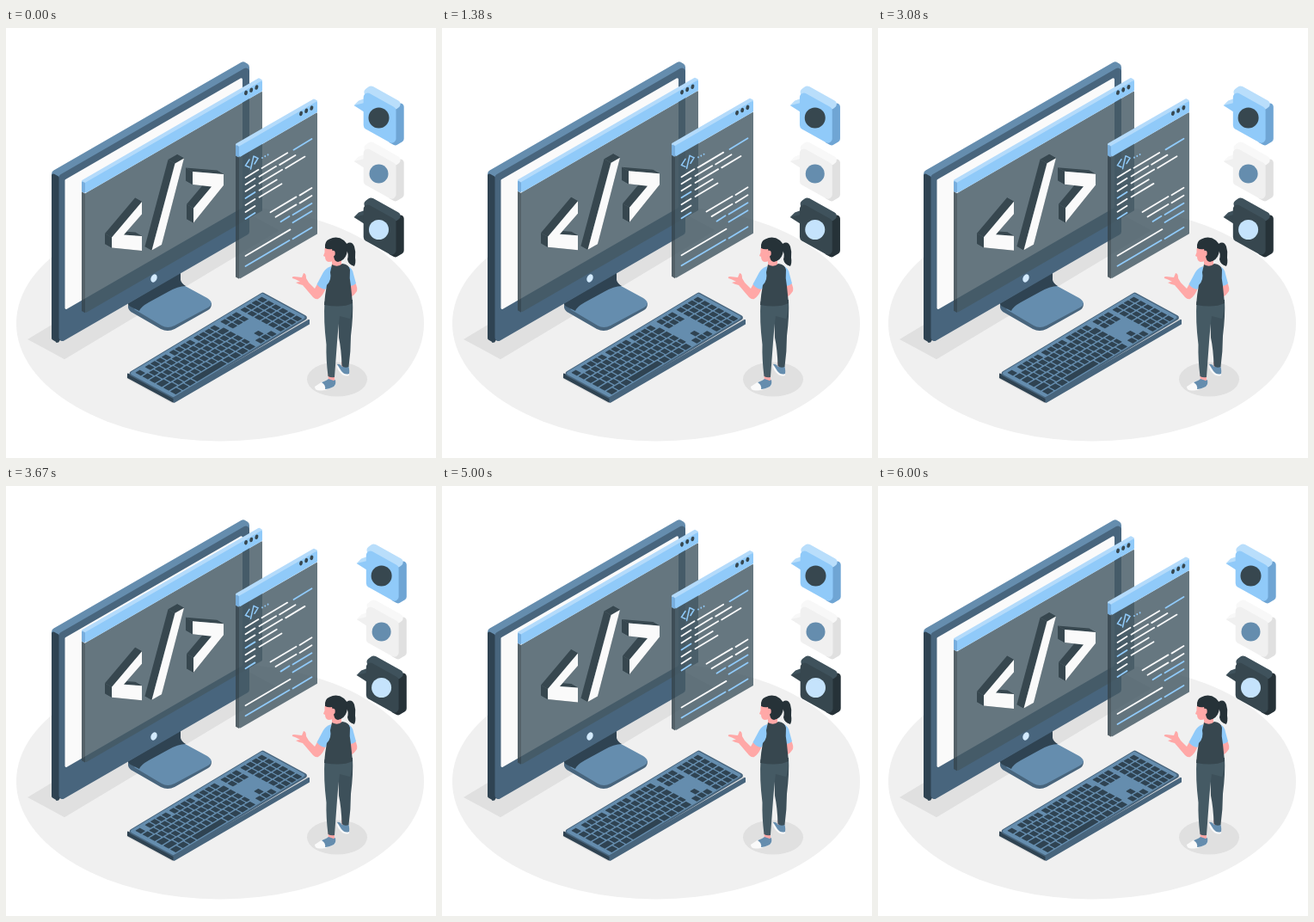
An HTML page with a canvas that plays this animation: 500 px wide and 500 px high, repeating every 6.04 s.

```html
<!DOCTYPE html>
<html lang="en">
<head>
<meta charset="utf-8">
<title>Isometric coding scene</title>
<style>
  html, body { margin: 0; width: 100%; height: 100%; overflow: hidden; background: #fff; }
  canvas { display: block; width: 500px; height: 500px; }
</style>
</head>
<body>
<canvas id="stage"></canvas>
<script>
const canvas = document.getElementById('stage');
const ctx = canvas.getContext('2d');
const ratio = window.devicePixelRatio || 1;
canvas.width = canvas.height = 500 * ratio;

const LOOP = 6040;
const FRAME = 1000 / 24;
const ISO = Math.tan(Math.PI / 6);
const SKY = '#90caf9', STEEL = '#658dae', SLATE = '#48657d', NAVY = '#2f4352';
const INK = '#263238', COAL = '#37474f', GREY = '#455a64', SKIN = '#ffa8a7';
const PAPER = '#fafafa', SHADE = '#e0e0e0';
const GLASS = 'rgba(69,90,100,.82)', GLASS_EDGE = 'rgba(55,71,79,.85)';

function shape(color, d) {
  ctx.fillStyle = color;
  ctx.fill(new Path2D(d));
}

function line(color, width, d) {
  ctx.strokeStyle = color;
  ctx.lineWidth = width;
  ctx.stroke(new Path2D(d));
}

// Polygon from a flat list of coordinates, with optional corner rounding.
function poly(color, c, r = 0) {
  const n = c.length;
  ctx.beginPath();
  ctx.moveTo((c[n - 2] + c[0]) / 2, (c[n - 1] + c[1]) / 2);
  for (let i = 0; i < n; i += 2) {
    ctx.arcTo(c[i], c[i + 1], c[(i + 2) % n], c[(i + 3) % n], r);
  }
  ctx.closePath();
  ctx.fillStyle = color;
  ctx.fill();
}

// Upright isometric face; a negative slope rises to the right.
function wall(color, x, y, w, h, r = 0, slope = -ISO) {
  const d = w * slope;
  poly(color, [x, y, x + w, y + d, x + w, y + d + h, x, y + h], r);
}

// Plate lying on the floor: corner (x, y), long side going up right, short side down right.
function plate(color, x, y, long, short, r = 0) {
  poly(color, [x, y, x + long, y - long * 0.6, x + long + short, y + short * 0.54 - long * 0.6, x + short, y + short * 0.54], r);
}

// Flat face with its sides swept back along (dx, dy).
function extrude(face, side, c, dx, dy) {
  const n = c.length;
  for (let i = 0; i < n; i += 2) {
    const x = c[(i + 2) % n], y = c[(i + 3) % n];
    poly(side, [c[i], c[i + 1], x, y, x + dx, y + dy, c[i] + dx, c[i + 1] + dy]);
  }
  poly(face, c);
}

function oval(color, x, y, rx, ry = rx, turn = 0) {
  ctx.beginPath();
  ctx.ellipse(x, y, rx, ry, turn, 0, Math.PI * 2);
  ctx.fillStyle = color;
  ctx.fill();
}

function at(x, y, draw) {
  ctx.save();
  ctx.translate(x, y);
  draw();
  ctx.restore();
}

function seeded(seed) {
  return () => (seed = (seed * 16807) % 2147483647) / 2147483647;
}

function floor() {
  oval('#f0f0f0', 249, 343.5, 237, 137);
  plate(SHADE, 25, 362, 250, 43);
  plate(SHADE, 137, 406, 161, 57, 3);
  oval(SHADE, 385, 408.5, 35, 20);
}

function monitor() {
  shape(SLATE, 'M142 320V325Q143 329 147 331L180 350Q188 354 196 350L235 328Q239 326 239 320L200 310Z');
  shape(STEEL, 'M202 296Q206 299 210 301L234 314Q243 320 235 325L196 346Q188 350 181 346L149 327L158 319Z');
  shape(NAVY, 'M142 320L203 284V293Q204 297 209 300Q200 300 188 307L166 319Q157 324 155 329L147 325Q142 323 142 320Z');

  poly(STEEL, [53, 167, 276, 38.5, 283, 43, 283, 70, 62, 195, 53, 190], 5);
  wall(NAVY, 53, 168, 9, 194, 2, ISO);
  wall(NAVY, 58, 176, 20, 190);
  wall(SLATE, 61.5, 171.5, 221.5, 195.5, 4);
  wall(PAPER, 68.5, 176.5, 206.5, 151.5, 1.5);
  oval('#d3eafd', 172, 291, 3.5, 4.8, 0.4);
}

// Glass window; (x, y) is the upper left corner of its front face.
function pane(x, y, w, bar, h) {
  const r = x + w, top = y - w * ISO;
  wall(GLASS_EDGE, x - 4, y + bar - 2, 4, h - bar - 0.5, 0, ISO);
  wall(GLASS, x, y + bar, w, h - bar, 1);
  poly('#b4dbfb', [x - 4, y - 2.2, r - 4, top - 2.2, r, top, r, top + 3, x, y + 3, x - 4, y + 2], 1.5);
  wall('#78aede', x - 4, y - 1.5, 4, bar - 0.5, 1, ISO);
  wall(SKY, x, y + 0.5, w, bar - 0.5, 1.2);
  for (let i = 0; i < 3; i++) {
    oval(COAL, r - 6.6 - i * 6.2, top + 8.6 + i * 3.2, 1.9, 2.8, 0.3);
  }
}

function bigCode() {
  extrude(PAPER, COAL, [123, 243.5, 158, 202, 158, 216.5, 137, 240.5, 158, 242, 158, 259, 123, 255.5], -8, -4.5);
  extrude(PAPER, COAL, [196.5, 157.5, 207, 151.5, 181, 252, 169.5, 258.5], -8, -4.5);
  extrude(PAPER, COAL, [217, 167, 253, 170, 253, 183, 218, 226.5, 218, 209.5, 239, 184.5, 217, 182], -8, -4.5);
}

// Code stroke from x = a to b on the slanted row that meets the margin at y.
function codeLine(y, a, b, color = PAPER) {
  const fall = x => y - (x - 278) * ISO;
  line(color, 1.8, `M${a + 0.5} ${fall(a)}L${b - 0.5} ${fall(b)}`);
}

function listing() {
  const rand = seeded(7);
  ctx.lineCap = 'round';
  line(SKY, 1.5, 'M283 153L278.5 160L283 162M284.5 164L288 149M289 149.5L293 151.5L289 158');
  for (let i = 0; i < 3; i++) oval(SKY, 298 + i * 3.3, 151 - i * 1.8, 0.9, 1.1);

  for (let i = 0; i < 7; i++) {
    const y = 174 + i * 8;
    if (i) codeLine(y, 278, 290, i % 3 ? PAPER : SKY);
    const end = i < 3 ? 330 + i * 9 : 321;
    for (let x = i ? 294 : 278; i < 5 && x < end - 4;) {
      const stop = Math.min(end, x + 16 + rand() * 16);
      codeLine(y, x, stop);
      x = stop + 3;
    }
  }
  codeLine(174, 334, 356, SKY);

  for (let i = 0; i < 4; i++) {
    const y = 231 + i * 9, color = i < 2 ? PAPER : SKY, gap = i < 2 ? 338 : 330;
    if (i < 3) codeLine(y, 307 + i * 6, gap, color);
    codeLine(y, gap + 3, 356, color);
  }
  codeLine(265, 278, 331);
  codeLine(277, 278, 330, SKY);
  codeLine(277, 333, 356, SKY);
}

// Key in keyboard space: a runs along the long side, b along the short one.
function key(a, b, w, h = 0.122) {
  const p = (u, v) => [141 + 157 * u + 54 * v, 402 - 94 * u + 29 * v];
  poly(NAVY, [...p(a, b), ...p(a + w, b), ...p(a + w, b + h), ...p(a, b + h)], 0.5);
}

function keyRow(a, b, count, pitch) {
  for (let i = 0; i < count; i++) key(a + i * pitch, b, pitch - 0.008);
}

function keyboard() {
  wall(NAVY, 141, 401, 54, 6, 1, 0.54);
  wall(SLATE, 194.5, 430, 158.5, 6.5, 1, -0.58);
  plate(SLATE, 140.5, 402, 158, 54.5, 3);
  plate(STEEL, 143, 401.5, 155, 51.5, 2);

  key(0.035, 0.07, 0.034);
  for (let g = 0; g < 3; g++) keyRow(0.105 + g * 0.18, 0.07, 4, 0.041);
  for (let r = 1; r < 5; r++) {
    const b = 0.07 + r * 0.15, lead = 0.032 + r * 0.008;
    key(0.035, b, lead);
    keyRow(0.044 + lead, b, 12, 0.042);
    key(0.548 + lead, b, 0.09 - lead);
  }
  keyRow(0.035, 0.82, 3, 0.053);
  key(0.194, 0.82, 0.22);
  keyRow(0.423, 0.82, 4, 0.053);
  for (const b of [0.07, 0.22, 0.82]) keyRow(0.665, b, 3, 0.042);
  key(0.707, 0.67, 0.033);
  for (let r = 0; r < 6; r++) keyRow(0.812, 0.07 + r * 0.15, 4, 0.042);
}

function woman() {
  // shoes and ankles
  shape(SKIN, 'M390 388H398L397 397L391 396ZM374.5 402H382V413L375 412Z');
  shape(PAPER, 'M385 392Q384 395 388 400Q393 406 399 404V400Z');
  shape(STEEL, 'M385 391Q388 390 391 394L397 391Q400 396 399 402Q394 404 390 399Z');
  shape(PAPER, 'M359 417Q359 422 366 421.5Q371 422 376 419L383 416V412L368 411Z');
  shape(STEEL, 'M367 412Q373 410 375 408L381 410L383 409Q384 415 381 417Q375 420 371 420Q372 415 367 412Z');

  // trousers
  shape('#3d505a', 'M386 318L403 316Q404 334 401 358Q401 376 398.5 394Q394 396 390.5 393Q390 374 387 360Z');
  shape(GREY, 'M370.5 318L403 317Q403 330 400 338L388 335Q386 350 385 365L382 406Q378 407 374.5 405Q372 385 372.5 368Q369 340 370.5 318Z');

  // arms and hand
  shape(SKIN, 'M399 298L406 296Q409 302 408 306Q405 311 401 313L400 308Z');
  shape(SKIN, 'M363 296L372 302Q369 311 363 315Q360 316 357 313L345 299Q340 298 337 296Q340 295 342 295Q337 292 333 291Q332 289 335 289L344 290L346 285Q349 285 349 291L352 296L359 303Z');

  // sleeves, neck and vest
  shape(SKY, 'M378 277Q372 279 369 284L361.5 298Q365 303 371 304L379 294Z');
  shape(SKY, 'M397 277Q403 279 404 286L407 297Q403 301 398 300Z');
  shape(SKIN, 'M379 264H390V278Q384 280 379 277Z');
  shape(COAL, 'M379 275Q386 279 391 274Q399 275 400 281Q399 291 401 300L403 320Q391 326 370 322Q371 309 373 299Q379 293 377 284Z');

  // head
  shape(SKIN, 'M372 252Q370 257 370.5 261L369 265L371 266Q371 271 375 272Q380 272 385 268L386 254Z');
  shape(INK, 'M371 256Q370 248 376 245.5Q385 241 393 247Q400 253 396 263Q394 270 386 272Q381 271 381 264L379 257Q375 258 371 256Z');
  shape(INK, 'M396 251Q402 247 405 254Q407 260 406 267Q407 273 405 277Q398 275 397 269Q399 262 395 257Z');
  oval(SKIN, 380.5, 262, 2.2, 3.2);
}

function badge(y, top, front, side, mark, size) {
  at(0, y, () => {
    poly(front, [404.5, 90, 417, 84, 417, 98]);
    poly(top, [404.5, 90, 410, 84.5, 417, 82, 417, 87]);
    poly(side, [445, 92, 462.7, 86, 462.7, 131, 453, 137, 445, 133], 4);
    poly(top, [415.5, 73, 424, 66.5, 463, 88, 453, 95, 440, 92, 418, 80], 5);
    wall(front, 415.7, 72, 37.8, 44, 5, 0.56);
    oval(mark, 433.5, 104.5, size);
  });
}

// Shake: a linear walk through ten equal spans, mirrored about the middle.
const SHAKE = [0, -1, 2, -4, 4, -4];
function shake(t) {
  const p = 5 - Math.abs(5 - (t % 6000) / 600), i = Math.min(4, Math.floor(p));
  return SHAKE[i] + (SHAKE[i + 1] - SHAKE[i]) * (p - i);
}

function hover(t) {
  return -5 * (1 - Math.cos(2 * Math.PI * t / 1500));
}

function render(t) {
  ctx.setTransform(ratio, 0, 0, ratio, 0, 0);
  ctx.fillStyle = '#fff';
  ctx.fillRect(0, 0, 500, 500);
  floor();
  monitor();
  at(0, hover(t), () => {
    pane(92, 179.3, 206, 13, 152.2);
    bigCode();
    pane(271, 137, 91, 13.5, 155);
    listing();
  });
  keyboard();
  woman();
  at(shake(t), 0, () => {
    badge(0, '#b9defb', SKY, '#6fa5d4', COAL, 12);
    badge(65, '#f8f8f8', '#f0f0f0', SHADE, STEEL, 11);
    badge(130, '#3f525c', COAL, INK, '#c5e3fc', 11.5);
  });
}

const start = performance.now();
function tick() {
  const t = (performance.now() - start) % LOOP;
  render(Math.floor((t + 4.9) / FRAME) * FRAME);
  requestAnimationFrame(tick);
}
tick();
</script>
</body>
</html>
```
